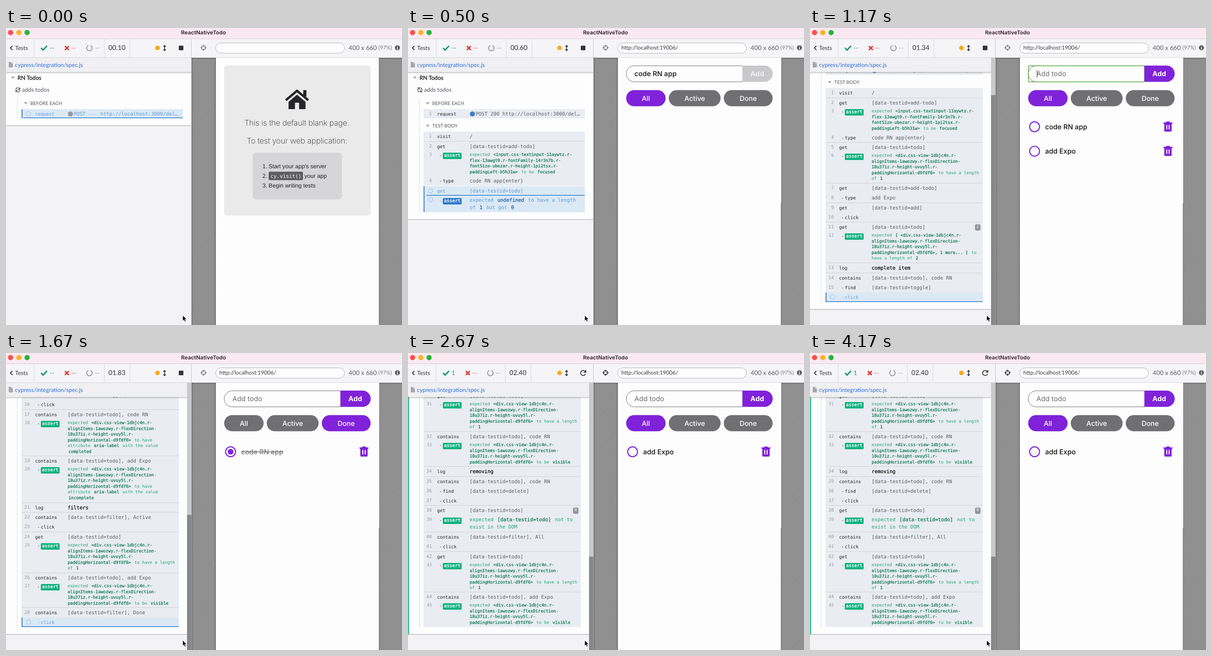
These frames come from a looping animation (864 px wide and 648 px high, 4340 ms). An HTML page:

```html
<!DOCTYPE html>
<html lang="en">
<head>
<meta charset="utf-8">
<title>ReactNativeTodo</title>
<style>
  html, body { margin: 0; width: 100%; height: 100%; overflow: hidden; background: #f3f3f6; }
  #stage { position: relative; width: 864px; height: 648px; overflow: hidden; }
  #stage > svg { position: absolute; left: 0; top: 0; }
  svg, #log { font-family: Lato, sans-serif; text-rendering: geometricPrecision; }
  #log { position: absolute; left: 0; top: 0; width: 404px; height: 648px; overflow: hidden; }
  #log.scrolled { width: 395px; }
  #log > * { position: absolute; }
  .panel { left: 0; right: 0; background: #fefdfe; border-bottom: 2px solid #cbcacd; }
  .panel.passed { border-left: 2px solid #12b480; }
  .rail { left: 24px; width: 1px; background: #dcdde0; }
  .label { line-height: 20px; white-space: pre; color: #55565c; }
  .caret { border: 4px solid transparent; border-top: 5px solid #a5a6ab; border-bottom: 0; }
  .row { left: 34px; right: 18px; background: #e9ecf0; color: #5b5d62;
         font: 10.8px "DejaVu Sans Mono", monospace; }
  .row.parent { box-shadow: 0 -1px #ced3d8; }
  .row > * { position: absolute; line-height: 21px; white-space: pre; }
  .num { left: 0; width: 18px; text-align: right; font-size: 10px; color: #989ca5; }
  .name { left: 29.5px; top: .5px; font-size: 9.95px; color: #222428; }
  .child { left: 34px; }
  .child span { margin-left: 2px; }
  .msg { left: 100.5px; }
  .clip { right: 9px; overflow: hidden; text-overflow: ellipsis; }
  .clip i { display: inline-block; width: 11px; height: 11px; margin-right: 2px; border-radius: 50%;
            background: #3b7dc8; vertical-align: -1.5px; }
  .log .msg { color: #111; -webkit-text-stroke: .3px; }
  .assert .num { font-size: 9.2px; line-height: 15px; }
  .assert .name { top: 2.3px; line-height: 15px; }
  .assert .name span { display: inline-block; height: 13.5px; line-height: 13.5px; margin-left: 2px;
                       padding: 0 2.5px; border-radius: 2px; background: #0bb27b; color: #fff;
                       -webkit-text-stroke: .3px; }
  .assert .msg { top: 2.2px; font-size: 9.2px; line-height: 12.55px; color: #1fa878; }
  .assert.big .num { top: 2px; }
  .assert.big .name { top: 4px; }
  .assert.big .msg { font-size: 10.8px; line-height: 16px; }
  .msg b { padding: 0 2px; font-weight: 400; color: #0c7a55; -webkit-text-stroke: .3px; }
  .count { right: 5px; top: 4px; width: 12px; height: 13.5px; border-radius: 4px; background: #939498;
           color: #fff; font-size: 9px; line-height: 13.5px !important; text-align: center; }
  .live { background: #dbe9f5; box-shadow: inset 2px 0 #3a7fc6 !important; }
  .live .name, .live .msg { color: #5a99d6; }
  .live .msg b { color: #1d5d9f; }
  .live.assert .name span { background: #2f79c9; color: #fff; }
  .live .clip i { background: #9a9a9c; }
  .spin { left: 9px; top: 4px; }
  .assert .spin { top: 2px; }
  .progress { right: 0; bottom: 0; height: 2px; background: #5598d6; }
  .app { font-family: Inter, sans-serif; font-size: 15px; font-weight: 500; }
</style>
</head>
<body>
<div id="stage">
  <div id="log"></div>
  <svg width="864" height="648" viewBox="0 0 864 648">
    <defs>
      <pattern id="hatch" width="3" height="3" patternUnits="userSpaceOnUse" patternTransform="rotate(45)">
        <rect width="3" height="3" fill="#898889"/><rect width="1.3" height="3" fill="#9b9a9b"/>
      </pattern>
      <linearGradient id="shade" x2="0" y2="1">
        <stop stop-color="#000" stop-opacity=".22"/><stop offset="1" stop-color="#000" stop-opacity="0"/>
      </linearGradient>
      <linearGradient id="side">
        <stop stop-color="#000" stop-opacity=".2"/><stop offset="1" stop-color="#000" stop-opacity="0"/>
      </linearGradient>
    </defs>
    <rect width="864" height="23" fill="#fbe9f2"/>
    <rect y="23" width="864" height="1" fill="#d8cdd3"/>
    <circle cx="10" cy="10" r="5.7" fill="#fb5049"/>
    <circle cx="28" cy="10" r="5.7" fill="#fdb125"/>
    <circle cx="46" cy="10" r="5.7" fill="#22b63a"/>
    <text x="431" y="13.5" text-anchor="middle" font-family="Inter, sans-serif" font-size="11.8" font-weight="700" fill="#3c363a">ReactNativeTodo</text>

    <rect y="24" width="864" height="41" fill="#f5f4f6"/>
    <rect y="65" width="404" height="31" fill="#f0eff2"/>
    <rect y="64" width="864" height="1" fill="#d6d5d8"/>
    <rect y="96" width="404" height="4" fill="url(#shade)"/>
    <path d="M6 74h6l3 3v9H6z" fill="#a6a6ab"/><path d="M12 74v3h3" fill="none" stroke="#eee"/>
    <text x="19.5" y="84.5" font-size="12.5" fill="#2a6fdc">cypress/integration/spec.js</text>

    <rect x="405" y="65" width="459" height="583" fill="url(#hatch)"/>
    <rect x="405" y="65" width="459" height="4" fill="url(#shade)"/>
    <rect x="405" y="65" width="4" height="583" fill="url(#side)"/>
    <rect x="813" y="65" width="4" height="583" fill="url(#side)"/>
    <rect x="-458" y="65" width="4" height="583" fill="url(#side)" transform="scale(-1 1)"/>
    <rect x="458" y="65" width="355.5" height="583" fill="#fefdfe"/>
    <rect x="404" y="24" width="1" height="624" fill="#c3c2c5"/>

    <path d="M14 39l-4.5 4.5 4.5 4.5" fill="none" stroke="#333" stroke-width="1.8"/>
    <text x="20" y="48" font-size="12.6" fill="#37373b">Tests</text>
    <rect x="457.5" y="32.5" width="281" height="22.5" rx="11.2" fill="#fefefe" stroke="#adacaf"/>
    <text x="747.5" y="47.5" font-size="13.7" fill="#5f5e63">400 x 660</text>
    <text x="812.5" y="47" font-size="11.8" fill="#7b7a7f">(97%)</text>
    <circle cx="854" cy="43" r="5.5" fill="#5a595d"/>
    <path d="M854 39.3v1.8M853 42.3h1.2v4M852.8 46.2h2.6" fill="none" stroke="#fff" stroke-width="1.3"/>
    <g id="bar"></g>
    <g id="app" class="app"></g>
    <g id="scroll"></g>
    <path d="M385.5 627v12.2l2.8-2.6 1.9 4.3 2.2-1-1.9-4.1h3.9z" stroke="#fff" stroke-width=".8"/>
  </svg>
</div>
<script>
const LOOP = 4340, PURPLE = '#7f22d9', GRAY = '#706f72';
const $ = id => document.getElementById(id);

// Test log: "command message", a leading dash marks a child command, *stars* mark emphasis.
const by = id => `[data-testid=${id}]`;
const view = `<div.css-view-1dbjc4n.r-
alignItems-1awozwy.r-flexDirection-
18u37iz.r-height-uvuy5l.r-
paddingHorizontal-d9fdf6>`;
const expectView = rest => `-assert expected *${view}* ${rest}`;
const hasOne = expectView('to have a length\nof *1*');
const visible = expectView('to be *visible*');
const labelled = value => expectView(`to have\nattribute *aria-label* with the value\n*${value}*`);
const contains = (id, s) => `contains ${by(id)}, ${s}`;

const rows = [
  'visit /',
  'get ' + by('add-todo'),
  `-assert expected *<input.css-textinput-11aywtz.r-
flex-13awgt0.r-fontFamily-14r3n7b.r-
fontSize-ubezar.r-height-1pi2tsx.r-
paddingLeft-b5h31w>* to be *focused*`,
  '-type code RN app{enter}',
  'get ' + by('todo'), hasOne,
  'get ' + by('add-todo'), '-type add Expo',
  'get ' + by('add'), '-click',
  'get ' + by('todo'),
  `-assert expected *[ ${view}, 1 more... ]* to\nhave a length of *2*`,
  'log complete item',
  contains('todo', 'code RN'), '-find ' + by('toggle'), '-click',
  contains('todo', 'code RN'), labelled('completed'),
  contains('todo', 'add Expo'), labelled('incomplete'),
  'log filters',
  contains('filter', 'Active'), '-click',
  'get ' + by('todo'), hasOne,
  contains('todo', 'add Expo'), visible,
  contains('filter', 'Done'), '-click',
  'get ' + by('todo'), hasOne,
  contains('todo', 'code RN'), visible,
  'log removing',
  contains('todo', 'code RN'), '-find ' + by('delete'), '-click',
  'get ' + by('todo'),
  `-assert expected *${by('todo')}* not to\nexist in the DOM`,
  contains('filter', 'All'), '-click',
  'get ' + by('todo'), hasOne,
  contains('todo', 'add Expo'), visible
];
const counts = { 11: 2, 38: 0 };

// n: commands shown, p: progress bar inset, wait: text of a pending assertion.
const first = ['code RN app'], second = ['add Expo'], struck = ['code RN app', true];
const steps = [
  { t: 0, clock: '00.10', n: 0, p: 4 },
  { t: 170, clock: '00.27', n: 1, p: 3 },
  { t: 340, clock: '00.43', n: 4, p: 3, app: { draft: 'code RN', focus: true } },
  { t: 500, clock: '00.60', n: 6, p: 6, app: { draft: 'code RN app', busy: true },
    wait: '-assert expected *undefined* to have a length\nof *1* but got *0*' },
  { t: 670, clock: '00.77', n: 8, p: 3, app: { draft: 'add E', focus: true, items: [first] } },
  { t: 840, clock: '01.00', n: 10, p: 2, app: { draft: 'add Expo', focus: true, items: [first] } },
  { t: 1000, clock: '01.17', n: 12, p: 6, app: { draft: 'add Expo', busy: true, items: [first] } },
  { t: 1170, clock: '01.34', n: 16, p: 2, app: { focus: true, items: [first, second] } },
  { t: 1330, clock: '01.50', n: 18, p: 4, app: { items: [struck, second] } },
  { t: 1500, clock: '01.66', n: 23, p: 2, app: { filter: 'Active', items: [second] } },
  { t: 1670, clock: '01.83', n: 29, p: 2, app: { filter: 'Done', items: [struck] } },
  { t: 1830, clock: '01.97', n: 37, p: 2, app: { filter: 'Done', items: [struck] } },
  { t: 2000, clock: '02.10', n: 39, p: 12, app: { filter: 'Done', items: [struck] },
    wait: expectView('not to exist in\nthe DOM') },
  { t: 2170, clock: '02.27', n: 41, p: 2, app: { items: [second] } },
  { t: 2330, clock: '02.40', n: 45, app: { items: [second] } }
];

const text = (x, y, s, attrs = '') => `<text x="${x}" y="${y}" ${attrs}>${s}</text>`;
const rect = (x, y, w, h, fill, rx = 0) =>
  `<rect x="${x}" y="${y}" width="${w}" height="${h}" rx="${rx}" fill="${fill}"/>`;
const line = (d, stroke, w = 1) => `<path d="${d}" fill="none" stroke="${stroke}" stroke-width="${w}"/>`;
const rich = s => s.replace(/</g, '&lt;').replace(/\*([^*]+)\*/g, '<b>$1</b>');

function parse(source) {
  const [, dash, name, msg] = /^(-?)(\S+) ?([^]*)$/.exec(source);
  const assert = name === 'assert', big = assert && !msg.includes('<');
  const h = !assert ? 21 : big ? 36 : 4.35 + 12.55 * msg.split('\n').length;
  return { dash, name, msg: rich(msg), assert, big, h };
}

const spinner = turn => `<svg class="spin" width="12" height="12"><circle cx="6" cy="6" r="4.8" fill="none"
  stroke="#5a99d6" stroke-width="1.3" stroke-dasharray="1.5 2.27" transform="rotate(${turn} 6 6)"/></svg>`;

function rowHtml(r, top, num, { live, bar, turn, clip = '', badge }) {
  const cls = ['row', r.name, !r.dash && num > 1 && 'parent', r.big && 'big', live && 'live'];
  return `<div class="${cls.filter(Boolean).join(' ')}" style="top:${top}px;height:${r.h}px">` +
    (live ? spinner(turn) : `<span class="num">${num}</span>`) +
    `<span class="name ${r.dash && 'child'}">${r.dash ? `-<span>${r.name}</span>` : r.name}</span>` +
    `<span class="msg ${clip}">${r.msg}</span>` +
    (badge === undefined ? '' : `<span class="count">${badge}</span>`) +
    (bar ? `<span class="progress" style="left:${bar}px"></span>` : '') + '</div>';
}

const label = (x, y, s, size, style = '') =>
  `<div class="label" style="left:${x}px;top:${y - 10}px;font-size:${size}px;${style}">${s}</div>`;
const caret = (x, y) => `<div class="caret" style="left:${x}px;top:${y}px"></div>`;

const reload = (turn, r, w, color) => `<g transform="rotate(${turn})" fill="none" stroke="${color}"
  stroke-width="${w}"><path d="M${-r} -1A${r} ${r} 0 0 1 ${r * .8} ${-r * .6}M${r} 1A${r} ${r} 0 0 1 ${-r * .8} ${r * .6}"/>
  <path d="M${r} -5v4h-4M${-r} 5v-4h4"/></g>`;

function drawLog(step, index) {
  const list = rows.slice(0, step.n).map(parse);
  if (step.wait) list[step.n - 1] = parse(step.wait);
  let end = step.n ? 226 : 197;
  list.forEach((r, i) => {
    if (i && !r.dash) end += .7;
    r.y = end;
    end += r.h;
  });
  const done = step.n === rows.length;
  const scroll = Math.max(0, end - 598);
  const at = y => Math.round(y - scroll);
  const firstLive = done ? step.n : step.n - (list.length && list[step.n - 1].assert ? 2 : 1);
  const turn = index * 30;

  let html = `<div class="panel ${done ? 'passed' : ''}" style="top:${at(97)}px;height:${at(end + 16) - at(97) - 1}px"></div>` +
    `<div class="rail" style="top:${at(153)}px;height:${at(end) - at(153)}px"></div>` +
    caret(11, at(106)) + label(25, at(108.5), 'RN Todos', 12.4, 'color:#111;-webkit-text-stroke:.25px') +
    `<svg width="14" height="14" style="left:18.5px;top:${at(128)}px"><g transform="translate(7 7)">${reload(turn, 4.5, 1.3, '#444')}</g></svg>` +
    label(35, at(134.5), 'adds todos', 12.5) +
    caret(39, at(162)) + label(53, at(165), 'BEFORE EACH', 10.4);
  const request = { name: 'request', dash: '', h: 20,
    msg: `<i></i>POST ${step.n ? '200' : '---'} http://localhost:3000/delete` };
  html += rowHtml(request, at(177), 1, { live: !step.n, bar: !step.n && step.p, turn, clip: 'clip' });
  if (step.n) html += caret(39, at(211)) + label(53, at(214), 'TEST BODY', 10.4);
  list.forEach((r, i) => {
    html += rowHtml(r, at(r.y), i + 1, {
      live: i >= firstLive, bar: i === firstLive && step.p, turn, badge: i >= firstLive ? undefined : counts[i + 1]
    });
  });
  $('log').className = scroll ? 'scrolled' : '';
  $('log').innerHTML = html;

  const thumb = 65 + 583 * scroll / (583 + scroll);
  $('scroll').innerHTML = scroll
    ? rect(395, 65, 9.5, 583, '#c9c8ca') + rect(395, thumb, 9.5, 648 - thumb, '#878688') : '';
}

function drawBar(step) {
  const done = step.n === rows.length, dx = done ? -2.3 : 0;
  const mark = (x, s, fill) => text(x, 48, s, `font-size="13.5" fill="${fill}"`);
  const target = done ? '#222' : '#77767a';
  const edge = x => rect(x, 24, 1, 40, '#d8d7da');
  $('bar').innerHTML = edge(61) +
    line('M76.5 43.5l4.5 4.5 8.5-9', '#0e9a6c', 3) + mark(95, done ? '1' : '--', '#1a9f73') +
    `<g transform="translate(${dx} 0)">` +
    line('M128.5 39.5l8.5 8.5m0-8.5l-8.5 8.5', '#e2342f', 3) + mark(142.3, '--', '#e2453f') +
    line('M179.5 38.2A6 6 0 1 0 184.5 38.2', '#97969a', 2) + mark(194, '--', '#97969a') +
    edge(214) + text(223.5, 48, step.clock, 'font-size="14.6" fill="#333236"') + edge(270) + '</g>' +
    '<circle cx="330.5" cy="43.5" r="5" fill="#fba81f"/>' +
    line('M346 38.5v10M343.3 41l2.7-3 2.7 3M343.3 46.5l2.7 3 2.7-3', '#333', 1.7) +
    (done ? line('M387 41A5.5 5.5 0 1 0 387.3 45.5M388 37.5v4.3h-4.6', '#333', 1.8)
          : rect(377, 38.5, 10, 10, '#333236', 1)) +
    `<circle cx="431" cy="43" r="4.6" fill="none" stroke="${target}" stroke-width="1.5"/>` +
    line('M431 36.5v4.5m0 4v4.5M424.5 43h4.5m4 0h4.5', target, 1.5) +
    (step.app ? text(465.5, 47.2, 'http://localhost:19006/', 'font-size="12.1" fill="#37363a"') : '');
}

function blankPage() {
  const title = 'text-anchor="middle" font-size="17" font-weight="200" letter-spacing="-.1" fill="#222"';
  const item = 'font-family="Liberation Sans, Arial, sans-serif" font-size="12.6" font-weight="400" fill="#222"';
  return rect(476, 82, 319.5, 327, '#ebeaeb', 5) +
    line('M610.5 157.5L635 137l24.5 20.5', '#262528', 5) + rect(648.5, 135.5, 7, 14, '#262528') +
    '<path d="M616.5 161L635 145.5l18.5 15.5v16h-14v-14h-9v14h-14z" fill="#262528"/>' +
    text(634.5, 213, 'This is the default blank page.', title) +
    text(635, 252, 'To test your web application:', title) +
    rect(538, 272, 195, 102, '#d6d5d7', 8) +
    text(559.5, 305.5, '1.', item) + text(573, 305.5, "Start your app's server", item) +
    text(559.5, 327, '2.', item) + rect(573, 313.5, 75, 18.5, '#5d5c5f', 3) +
    text(577, 326.5, 'cy.visit()', 'font-family="DejaVu Sans Mono, monospace" font-size="11.2" font-weight="400" fill="#fff"') +
    text(651, 327, 'your app', item) +
    text(559.5, 348, '3.', item) + text(573, 348, 'Begin writing tests', item);
}

function todo([name, struck], i) {
  const y = 215.5 + i * 53.3;
  return `<g transform="translate(0 ${y})"><circle cx="490" r="10.8" fill="none" stroke="${PURPLE}" stroke-width="2.2"/>` +
    (struck ? `<circle cx="490" r="6.2" fill="${PURPLE}"/>` : '') +
    text(513, 5.3, name, struck ? 'fill="#77767a" text-decoration="line-through"' : 'fill="#111"') +
    rect(777, -11.5, 8, 3, PURPLE, 1) + rect(771, -9.5, 20, 2.8, PURPLE, 1) + rect(773, -9, 16, 19.5, PURPLE, 2) +
    rect(777.3, -3.8, 2.2, 9.5, '#fff') + rect(782.5, -3.8, 2.2, 9.5, '#fff') + '</g>';
}

function todoPage({ draft = '', focus, busy, filter = 'All', items = [] }) {
  const button = (x, w, name) => rect(x, 135.5, w, 35.3, name === filter ? PURPLE : GRAY, 17.6) +
    text(x + w / 2, 158.6, name, 'text-anchor="middle" fill="#fff"');
  const caretX = 495 + draft.length * 8.4;
  return rect(458, 65, 356.3, 317, '#fefdfe') +
    line('M730 82.5H493.7a17.5 17.5 0 0 0 0 35H730', '#6b6a6d') +
    (focus ? '<rect x="476.5" y="82.5" width="253.5" height="35" rx="1.5" fill="none" stroke="#55a53c" stroke-width="1.5"/>' +
      rect(caretX, 92, 1, 16, '#222') : '') +
    text(494, 105.3, draft || 'Add todo', draft ? 'fill="#111"' : 'fill="#6c6b6f" font-weight="400"') +
    `<path d="M729.5 82h48.5a17.75 17.75 0 0 1 0 35.5h-48.5z" fill="${busy ? '#c9c8ca' : PURPLE}"/>` +
    text(762, 105.3, 'Add', `text-anchor="middle" font-weight="700" fill="${busy ? '#f1f0f1' : '#fff'}"`) +
    button(476, 86, 'All') + button(569, 113, 'Active') + button(689, 106.5, 'Done') +
    items.map(todo).join('');
}

let shown = -1;
function frame(now) {
  const t = now % LOOP;
  let i = steps.length - 1;
  while (steps[i].t > t) i--;
  if (i !== shown) {
    const step = steps[shown = i];
    drawLog(step, i);
    drawBar(step);
    $('app').innerHTML = step.app ? todoPage(step.app) : blankPage();
  }
  requestAnimationFrame(() => frame(performance.now() - start));
}
const start = performance.now();
frame(0);
</script>
</body>
</html>
```
